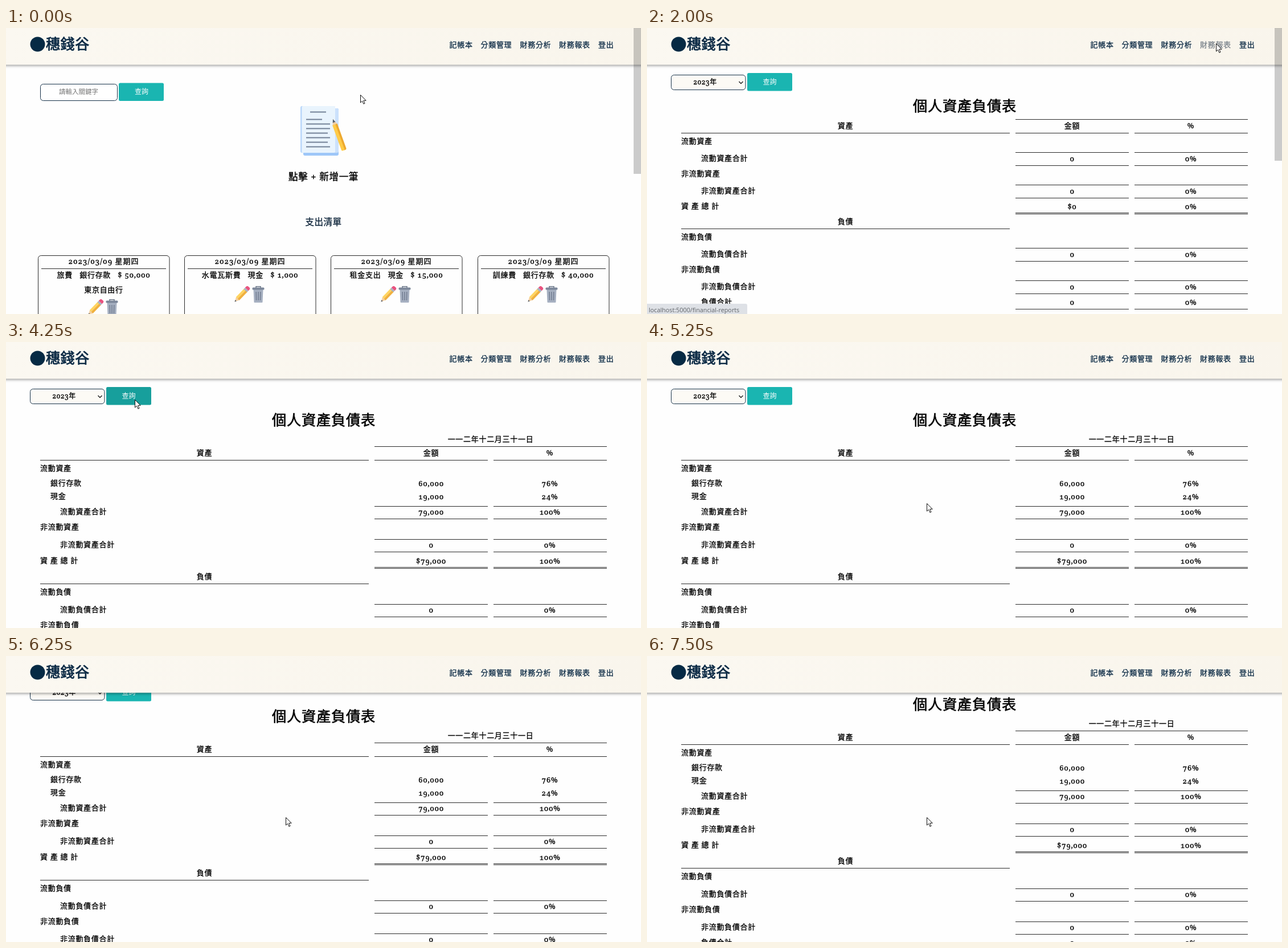
An HTML page for the animation above (8000 ms loop, 1115 by 502 pixels).

```html
<!DOCTYPE html>
<html lang="zh-Hant">
<head>
<meta charset="utf-8">
<title>記帳本</title>
<style>
html, body { margin: 0; width: 100%; height: 100%; overflow: hidden; background: #fefefe; }
svg { display: block; width: 1115px; height: 502px; }
text {
  font: 500 13px 'Noto Serif', 'Noto Sans CJK TC', 'Noto Sans CJK JP', 'Noto Sans CJK', sans-serif;
  font-variant-numeric: oldstyle-nums;
  letter-spacing: .7px;
  white-space: pre;
  fill: currentColor;
  stroke: currentColor;
}
.header { filter: drop-shadow(0 2px 2px rgba(0, 0, 0, .36)); }
.nav { color: #0b2a45; }
.status { color: #5f6368; }
.status text { font: 10.8px 'Open Sans', 'Noto Sans CJK TC', sans-serif; letter-spacing: 0; stroke: none; }
.rule { stroke: #2b2b2b; fill: none; }

#list, #sheet, #empty, #filled, #scroll, #cursor, #thumb, #report, #query, #link, #wait, #category {
  animation: 8s step-end infinite;
}
#cursor { animation-name: cursor; }
#list { animation-name: list; }
#sheet { animation-name: sheet; }
#scroll { animation-name: scroll; }
#empty { animation-name: empty; }
#filled { animation-name: filled; }
#thumb { animation-name: thumb; }
#report { animation-name: report; }
#query { animation-name: query; }
#link { animation-name: link; }
#wait { animation-name: wait; }
#category { animation-name: category; }

@keyframes cursor {
  0% { transform: translate(622px, 117px); }
  6.25% { transform: translate(840px, 109px); }
  9.375% { transform: translate(988px, 55px); }
  12.5% { transform: translate(1002px, 28px); }
  15.625% { transform: translate(999px, 27px); }
  31.25% { transform: translate(808px, 68px); }
  34.375% { transform: translate(711px, 103px); }
  37.5% { transform: translate(309px, 107px); }
  40.625% { transform: translate(229px, 94px); }
  43.75% { transform: translate(226px, 101px); }
  62.5% { transform: translate(408px, 230px); }
  65.625%, 100% { transform: translate(491px, 283px); }
}
@keyframes scroll {
  0% { transform: none; }
  75% { transform: translateY(-12px); }
  78.125% { transform: translateY(-31px); }
  81.25% { transform: translateY(-42px); }
  84.375% { transform: translateY(-48px); }
  87.5%, 100% { transform: translateY(-52px); }
}
@keyframes list { 0% { visibility: visible; } 25%, 100% { visibility: hidden; } }
@keyframes sheet { 0% { visibility: hidden; } 25%, 100% { visibility: visible; } }
@keyframes empty { 0% { visibility: hidden; } 25% { visibility: visible; } 53.125%, 100% { visibility: hidden; } }
@keyframes filled { 0% { visibility: hidden; } 53.125%, 100% { visibility: visible; } }
@keyframes thumb { 0% { height: 256px; } 25% { height: 233px; } 53.125%, 100% { height: 0; } }
@keyframes report { 0% { color: #0b2a45; } 15.625% { color: #7b848c; } 31.25%, 100% { color: #0b2a45; } }
@keyframes query { 0% { fill: #1ab5b1; } 43.75% { fill: #179f9c; } 62.5%, 100% { fill: #1ab5b1; } }
@keyframes link {
  0% { visibility: hidden; } 18.75% { visibility: visible; } 21.875% { visibility: hidden; }
  25% { visibility: visible; } 34.375%, 100% { visibility: hidden; }
}
@keyframes wait { 0% { visibility: hidden; } 21.875% { visibility: visible; } 25%, 100% { visibility: hidden; } }
@keyframes category { 0% { opacity: 0; } 34.375% { opacity: 1; } 37.5% { opacity: .3; } 40.625%, 100% { opacity: 0; } }
</style>
</head>
<body>
<svg viewBox="0 0 1115 502" xmlns="http://www.w3.org/2000/svg">
  <defs>
    <linearGradient id="cream" x2="1" y2="0">
      <stop stop-color="#fbf8f1"/><stop offset="1" stop-color="#f9f5ec"/>
    </linearGradient>
    <g id="pencil">
      <g transform="translate(1 27.5) rotate(-46)">
        <path d="M0 0L8 -4V4Z" fill="#f3cfa0"/>
        <path d="M0 0L3 -1.5V1.5Z" fill="#4f5661"/>
        <path d="M7.5 -4H28V0H7.5Z" fill="#ffd460"/>
        <path d="M7.5 0H28V4H7.5Z" fill="#f0b03e"/>
        <path d="M27 -4H30.500V4H27Z" fill="#a9b3c4"/>
        <path d="M30.500 -4H33Q36 -4 36 -1V1Q36 4 33 4H30.500Z" fill="#e9537f"/>
      </g>
    </g>
    <g id="trash">
      <path d="M6.500 3V.8H14.500V3" fill="none" stroke="#6f7a8c" stroke-width="1.600"/>
      <path d="M2 6H19L18 28Q18 29 17 29H4Q3 29 3 28Z" fill="#a6b0c1"/>
      <rect y="2.500" width="21" height="4" rx="1.500" fill="#7c879a"/>
      <path d="M6.700 10L7 25M10.500 10V25M14.300 10L14 25" stroke="#717c90" stroke-width="1.500"/>
    </g>
  </defs>

  <rect width="1115" height="502" fill="#fefefe"/>

  <g id="list">
    <rect x="60.500" y="98.500" width="135" height="29" rx="5" fill="#fff" stroke="#17324a"/>
    <rect x="198" y="96.500" width="79" height="31.500" rx="2.500" fill="#1ab5b1"/>
    <rect x="522" y="141" width="62" height="83" rx="3" fill="#9ec7f8"/>
    <rect x="524" y="141" width="60" height="78" rx="3" fill="#cbe1fc"/>
    <rect x="517" y="137" width="61" height="82" rx="3" fill="#b9d7fa"/>
    <rect x="519.500" y="137" width="58.500" height="82" rx="2" fill="#e9f4fd"/>
    <path d="M534 147.500H562M527 160.500H555M527 168.500H569M527 176.500H569M527 184.500H565M527 192.500H569M527 200.500H565M527 208.500H569"
      stroke="#728196" stroke-width="2.200"/>
    <g transform="translate(574 160) rotate(70)">
      <path d="M0 0L11 -4.500V4.500Z" fill="#f1cda1"/>
      <path d="M0 0L6 -2.500V2.500Z" fill="#56606e"/>
      <path d="M10 -4.500H56Q58 -4.500 58 -2.500V0H10Z" fill="#eda92f"/>
      <path d="M10 -1H58V2.500Q58 4.500 56 4.500H10Z" fill="#ffcb48"/>
    </g>
  </g>

  <g id="sheet">
    <g id="scroll">
      <g id="empty"></g>
      <g id="filled"></g>
    </g>
  </g>

  <g class="header"><rect x="-8" y="-8" width="1131" height="72.500" fill="url(#cream)"/></g>
  <circle cx="55.500" cy="28.500" r="13" fill="#062a44"/>
  <g class="nav" id="nav"></g>

  <g class="status" id="status"></g>
  <rect id="thumb" x="1102" width="13" height="256" fill="#000" fill-opacity=".2"/>
  <path id="cursor" d="M.5 .5V14L3.600 11.200L5.900 16.300L8 15.300L5.800 10.300H10.200Z" fill="#fff" stroke="#111"/>
</svg>

<script>
const $ = id => document.getElementById(id);
const add = (id, markup) => $(id).insertAdjacentHTML('beforeend', markup);

// Text centred vertically on y; bold is the outline that thickens the glyphs
const text = (s, x, y, { size = 13, anchor = 'start', color = '', gap = .7, bold = .3, id = '' } = {}) =>
  `<text ${id && `id="${id}"`} x="${x}" y="${y + size * .37}" text-anchor="${anchor}" stroke-width="${bold}"
    style="font-size:${size}px;letter-spacing:${gap}px;${color && `color:${color}`}">${s}</text>`;
const mid = (s, x, y, opt) => text(s, x, y, { anchor: 'middle', ...opt });
const line = (x1, x2, y) => `<path class="rule" d="M${x1} ${Math.floor(y) + .5}H${x2}"/>`;

// Header
add('nav', text('穗錢谷', 70, 28, { size: 25, gap: .6, bold: .8 })
  + text('記帳本', 778.500, 29.500) + text('分類管理', 833.500, 29.500)
  + text('財務分析', 902.500, 29.500) + text('財務報表', 971, 29.500, { id: 'report' })
  + text('登出', 1040, 29.500));

// Expense list
const button = { size: 12, gap: 0, color: '#fff', bold: 0 };
add('list', mid('請輸入關鍵字', 127.500, 112, { size: 11.500, gap: 0, color: '#777', bold: 0 })
  + mid('查詢', 238, 112, button)
  + mid('點擊 + 新增一筆', 557.500, 261, { size: 16.500, bold: .4 })
  + mid('支出清單', 557.500, 340.500, { size: 15.500, gap: .5, color: '#0b2238' }));

const card = (i, kind, account, cost, note) => {
  const x = Math.round(56 + i * 257.200), c = x + 115.500, y = note ? 476 : 453;
  return `<rect class="rule" x="${x + .5}" y="399.500" width="230.500" height="140" rx="5"/>`
    + line(x + 6, x + 225, 422) + mid('2023/03/09 星期四', c, 409.500, { gap: 1 })
    + mid(`${kind}   ${account}   $ ${cost}`, c, 433)
    + (note ? mid(note, c, 459.500) : '')
    + `<use href="#pencil" x="${c - 28}" y="${y}"/><use href="#trash" x="${c + 4}" y="${y}"/>`;
};
add('list', [
  ['旅費', '銀行存款', '50,000', '東京自由行'],
  ['水電瓦斯費', '現金', '1,000'],
  ['租金支出', '現金', '15,000'],
  ['訓練費', '銀行存款', '40,000']
].map((c, i) => card(i, ...c)).join(''));

// Balance sheet
const cells = y => line(647, 846, y) + line(856, 1055, y);
const values = (y, amount, share) => mid(amount, 746.500, y + 1) + mid(share, 955, y + 1);
const rows = {
  date: (y, s) => mid(s, 851, y) + line(647, 1055, y + 13),
  columns: y => mid('金額', 746.500, y) + mid('%', 955, y) + cells(y + 13),
  head: (y, s) => mid(s, 348.500, y) + line(60, 637, y + 13),
  group: (y, s) => text(s, 60, y),
  item: (y, s, ...v) => text(s, 78, y) + values(y, ...v),
  all: (y, s, ...v) => text(s, 95, y) + values(y, ...v) + cells(y + 13),
  sum: (y, ...r) => rows.all(y, ...r) + cells(y - 9.500),
  total: (y, s, ...v) => text(s, 60, y) + values(y, ...v) + cells(y + 12) + cells(y + 14)
};
const build = (id, list) => add(id, list.map(([kind, ...r]) => rows[kind](...r)).join(''));
const nil = ['0', '0%'];

add('scroll', `<rect x="42.500" y="82.500" width="130.500" height="26" rx="5" fill="#fcfaf5" stroke="#17324a"/>
  <path d="M161.500 94L165 97.500L168.500 94" fill="none" stroke="#222" stroke-width="1.500"/>
  <rect id="query" x="176" y="79" width="79" height="31.500" rx="2.500" fill="#1ab5b1"/>`
  + mid('2023年', 102, 95, { size: 12, gap: .3 }) + mid('查詢', 215.500, 94.500, button)
  + mid('個人資產負債表', 558, 137, { size: 25.200, gap: .8, bold: .6 }));

build('empty', [
  ['date', 147.500, ''], ['columns', 171], ['head', 171, '資產'],
  ['group', 198, '流動資產'], ['sum', 228, '流動資產合計', ...nil],
  ['group', 255, '非流動資產'], ['sum', 285, '非流動資產合計', ...nil],
  ['total', 312, '資 產 總 計', '$0', '0%'], ['head', 339, '負債'],
  ['group', 366, '流動負債'], ['sum', 396, '流動負債合計', ...nil],
  ['group', 423.500, '非流動負債'], ['sum', 453, '非流動負債合計', ...nil],
  ['all', 480, '負債合計', ...nil], ['group', 506.500, '權益']
]);
build('filled', [
  ['date', 170, '一一二年十二月三十一日'], ['columns', 194], ['head', 194, '資產'],
  ['group', 221, '流動資產'], ['item', 247.500, '銀行存款', '60,000', '76%'], ['item', 270.500, '現金', '19,000', '24%'],
  ['sum', 297.500, '流動資產合計', '79,000', '100%'],
  ['group', 324.500, '非流動資產'], ['sum', 355.500, '非流動資產合計', ...nil],
  ['total', 383, '資 產 總 計', '$79,000', '100%'], ['head', 411, '負債'],
  ['group', 438.500, '流動負債'], ['sum', 469.500, '流動負債合計', ...nil],
  ['group', 496.500, '非流動負債'], ['sum', 527.500, '非流動負債合計', ...nil],
  ['all', 554, '負債合計', ...nil]
]);

// Browser status bubble
const bubble = (id, width, s) => `<g id="${id}"><rect x="-4" y="484" width="${width + 4}" height="22" rx="3" fill="#dee1e6"/>
  <text x="3" y="498.500">${s}</text></g>`;
add('status', bubble('link', 176, 'localhost:5000/financial-reports')
  + bubble('wait', 370, '正在等候 localhost...')
  + bubble('category', 268, 'localhost:5000/categorymanagement/cost-category'));
</script>
</body>
</html>
```
